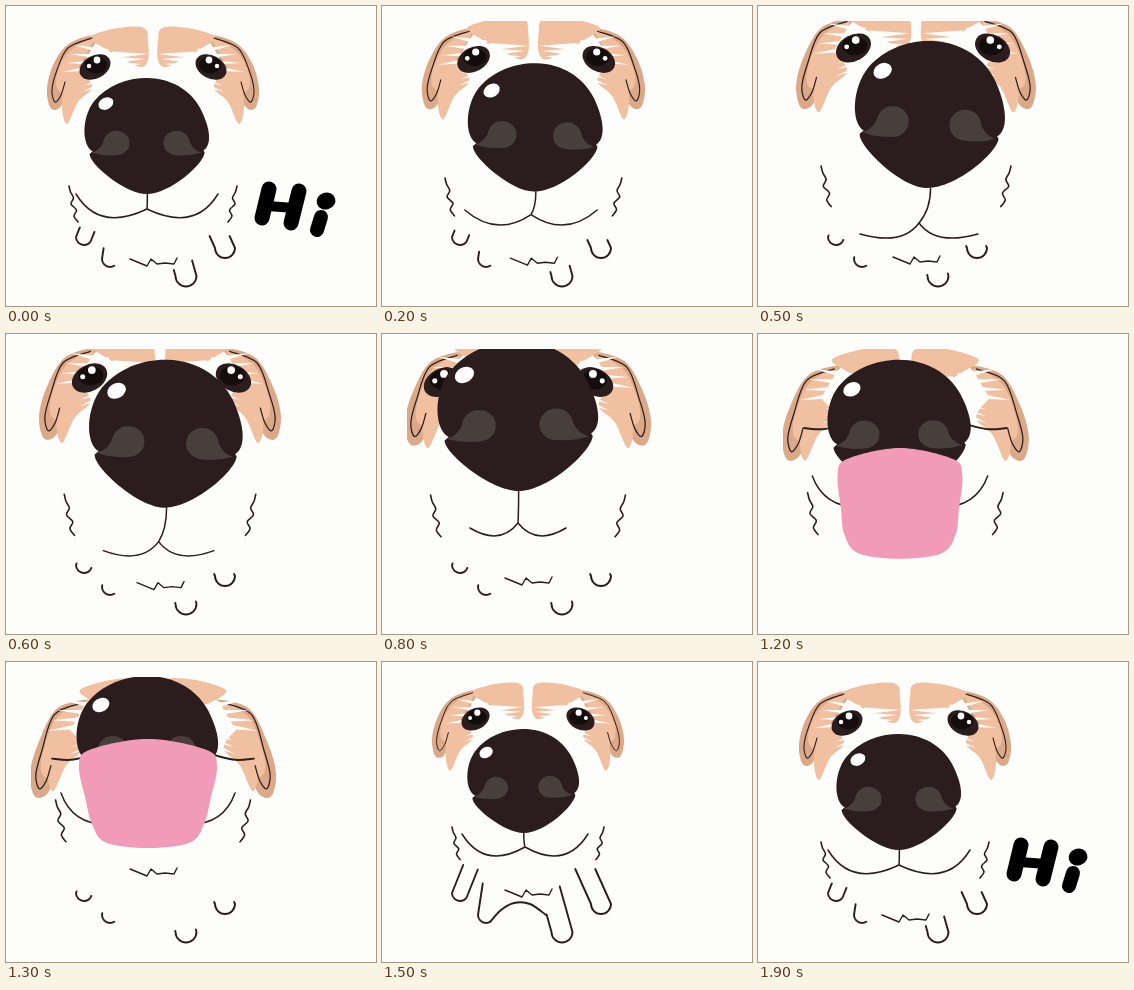
Write an HTML page with a canvas that moves like this. It is 370x300 px and loops after 2000 ms.

```html
<!DOCTYPE html>
<html lang="en">
<head>
<meta charset="utf-8">
<title>Puppy says Hi</title>
<style>
html, body { margin: 0; width: 100%; height: 100%; overflow: hidden; background: #fdfefc; }
canvas { display: block; }
</style>
</head>
<body>
<canvas id="stage" width="370" height="300" role="img" aria-label="Hi"></canvas>
<script>
const ctx = document.getElementById('stage').getContext('2d');
const LOOP = 2000, STEP = 100;
const PAPER = '#fdfefc', INK = '#2b1d1d', PEACH = '#f0c0a1', EAR = '#dba988', PINK = '#f19bb9';

// nose: left, top, width, height, tilt in degrees
// head: x, y, scale, ear drop; eyes: left and right shift
// mouth: joint x, joint y, half width, lift of the corners
// body: cheek fur y, chest fur y, leg length
// tongue: top, bottom, half width above, half width below
const rest = { nose: [78, 72, 125, 116, 0], head: [147, 61, 1, 0], eyes: [0, 0], mouth: [141, 203, 71, 15], body: [180, 253, 12] };
const lean = { nose: [96, 35, 151, 147, 3], head: [158, 42, 1.13, 11], eyes: [3, 11], mouth: [161, 217, 59, -11], body: [160, 251, 2] };
const near = { nose: [55, 7, 161, 150, -1], head: [146, 48, 1.16, 12], eyes: [-19, 0], mouth: [136, 189, 48, -5], body: [161, 244, 2] };
const pant = { nose: [67, 49, 147, 136, -1], head: [148, 55, 1.17, 3], eyes: [0, 0], mouth: [142, 187, 89, 23], body: [200, 230, 2], tongue: [188, 302, 49, 55] };
const lick = { nose: [70, 14, 142, 132, 0], head: [147, 63, 1.16, 20], eyes: [0, 0], mouth: [142, 155, 87, 24], body: [138, 207, 2], tongue: [77, 186, 69, 56] };
const stand = { nose: [85, 67, 112, 104, -1], head: [146, 57, 0.905, 0], eyes: [0, 0], mouth: [143, 185, 63, 13], body: [165, 228, 35] };
const keys = [[0, rest], [500, lean], [800, near], [1000, pant], [1300, lick], [1500, stand], [1900, rest], [2000, rest]];

for (const [, pose] of keys) pose.tongue ??= [pose.mouth[1], pose.mouth[1], 0, 0];

function poseAt(t) {
  const i = keys.findIndex(k => k[0] > t);
  const [t0, a] = keys[i - 1], [t1, b] = keys[i];
  const u = (t - t0) / (t1 - t0), pose = {};
  for (const part in a) pose[part] = a[part].map((v, n) => v + (b[part][n] - v) * u);
  return pose;
}

// Smooth curve through a flat list of points
function curve(p, closed) {
  const n = p.length / 2;
  const at = i => {
    const k = closed ? (i + n) % n : Math.max(0, Math.min(n - 1, i));
    return [p[2 * k], p[2 * k + 1]];
  };
  ctx.beginPath();
  ctx.moveTo(p[0], p[1]);
  for (let i = 0; i < (closed ? n : n - 1); i++) {
    const [a, b, c, d] = [at(i - 1), at(i), at(i + 1), at(i + 2)];
    ctx.bezierCurveTo(b[0] + (c[0] - a[0]) / 6, b[1] + (c[1] - a[1]) / 6,
      c[0] - (d[0] - b[0]) / 6, c[1] - (d[1] - b[1]) / 6, c[0], c[1]);
  }
}

function blob(color, p) {
  curve(p, true);
  ctx.fillStyle = color;
  ctx.fill();
}

function ink(width = 1.5, color = INK) {
  ctx.lineWidth = width;
  ctx.strokeStyle = color;
  ctx.stroke();
}

function line(p, width, color) {
  curve(p);
  ink(width, color);
}

function oval(color, x, y, rx, ry = rx, turn = 0) {
  ctx.beginPath();
  ctx.ellipse(x, y, rx, ry, turn, 0, 7);
  ctx.fillStyle = color;
  ctx.fill();
}

// Tapered white strand of fur
function tuft(x0, y0, x1, y1, w) {
  const dx = x1 - x0, dy = y1 - y0, k = w / Math.hypot(dx, dy);
  ctx.beginPath();
  ctx.moveTo(x0 - dy * k, y0 + dx * k);
  ctx.lineTo(x1, y1);
  ctx.lineTo(x0 + dy * k, y0 - dx * k);
  ctx.fillStyle = PAPER;
  ctx.fill();
}

function drawEye(x) {
  oval(INK, x, 61, 16.5, 11.5, -0.5);
  oval('#140d0d', x + 1, 59, 11, 8.5);
  oval('#fff', x + 2, 54, 3.4);
  oval('#fff', x - 6, 60, 2.2);
}

// Left half of the face, centre line at x = 0
function drawHalf(drop, shift, asleep) {
  ctx.save();
  ctx.translate(-147, -61);
  const d = drop, top = drop / 2;
  blob(EAR, [92, 29 + top, 64, 37 + top, 48, 57 + d, 41, 82 + d, 44, 101 + d, 52, 103 + d, 60, 92 + d, 70, 72, 84, 46]);
  blob(PEACH, [88, 32 + top, 64, 45 + top, 52, 65 + d, 51, 82 + d, 60, 84 + d, 72, 62 + top]);
  blob(PEACH, [62, 58, 78, 68, 86, 82, 72, 96, 61, 118, 56, 98]);
  blob(PEACH, [84, 31, 112, 22, 138, 22, 142, 36, 142, 54, 134, 61, 112, 50, 98, 42]);
  line([86, 32 + top, 62, 42 + top, 51, 64 + d, 46, 84 + d, 49, 96 + d, 55, 89 + d, 59, 76 + d], 1.1);
  for (let i = 0; i < 4; i++) {
    tuft(102 - 3 * i, 46 + 5 * i, 68 - 4 * i, 39 + 9 * i, 3);
    tuft(106, 49 + 5 * i, 142 - 3 * i, 48 + 5 * i, 3.5);
    tuft(106, 66 + 4 * i, 78 - i, 74 + 6 * i, 3);
  }
  if (asleep) line([60, 90, 76, 91, 94, 87], 1.7);
  else drawEye(89 + shift);
  ctx.restore();
}

function drawHead([x, y, s, drop], [left, right], asleep) {
  for (const side of [1, -1]) {
    ctx.save();
    ctx.translate(x, y);
    ctx.scale(s * side, s);
    drawHalf(drop, (side > 0 ? left : -right) / s, asleep);
    ctx.restore();
  }
}

function drawNose([x, y, w, h, tilt]) {
  ctx.save();
  ctx.translate(x + w / 2, y + h / 2);
  ctx.rotate(tilt * Math.PI / 180);
  ctx.scale(w, h);
  ctx.translate(-0.5, -0.5);
  ctx.fillStyle = INK;
  ctx.fill(new Path2D('M.07 .632C-.02 .58-.02 .34 .08 .2C.19 .06 .35 0 .5 0C.69 0 .85 .1 .93 .26C1.02 .45 1.02 .58 .955 .625L.965 .64C.96 .74 .69 1 .5 1C.33 1 .04 .74 .045 .655Z'));
  for (const side of [1, -1]) {
    ctx.save();
    ctx.translate(0.5, 0);
    ctx.scale(side, 1);
    oval('#483e3c', -0.24, 0.56, 0.105, 0.105);
    ctx.fill(new Path2D('M-.44 .643Q-.36 .62-.335 .52L-.24 .665Q-.35 .675-.44 .643Z'));
    ctx.restore();
  }
  oval('#fff', 0.175, 0.22, 0.064, 0.05, -0.6);
  ctx.restore();
}

function drawMouth([x, y, w, lift], [nx, ny, nw, nh]) {
  const stem = nx + nw * 0.507, low = ny + nh;
  ctx.beginPath();
  ctx.moveTo(stem, low);
  ctx.quadraticCurveTo(stem, (low + y) / 2 + 4, x, y);
  for (const side of [-1, 1]) {
    ctx.moveTo(x, y);
    ctx.quadraticCurveTo(x + side * w * (0.45 + lift * 0.015), y + 23, x + side * w, y - lift);
  }
  ink();
}

function drawCheekFur([x, , s], y) {
  for (const side of [-1, 1]) {
    const p = [];
    for (let i = 0; i <= 6; i++) {
      const kink = i > 1 && i < 6 ? (i % 2 ? 2.5 : -1.5) : 0;
      p.push(x + side * s * (84 - i * 1.5 + kink), y + i * 6 * s);
    }
    line(p, 1.6);
  }
}

function drawChest(x, y) {
  ctx.beginPath();
  for (const [dx, dy] of [[-23, 0], [-6, 7], [-2, 0], [4, 5], [12, 4], [21, 5], [24, -1]]) ctx.lineTo(x + dx, y + dy);
  ink(1.4);
}

// Paw: an arc with two legs that lean as they grow
function paw(x, y, r, end, lean, left, right) {
  const ex = x + r * Math.cos(end), ey = y + r * Math.sin(end);
  ctx.beginPath();
  ctx.moveTo(x - r + lean * left, y - left);
  ctx.arc(x, y, r, Math.PI, end, true);
  ctx.lineTo(ex + lean * right, ey - right);
  ink(1.9);
}

function drawPaws(leg) {
  paw(78, 231, 8, 0.6, 0.4, leg * 0.8, leg * 0.8);
  paw(104, 253, 8, 1, 0.15, leg * 0.9, 0);
  paw(180, 270, 10.5, 0, -0.28, leg * 0.5, leg * 1.3);
  paw(219, 242, 10, 0, -0.45, leg, leg);
  if (leg > 30) line([108, 260, 119, 248, 132, 241, 148, 242, 164, 253], 1.9);
}

function drawTongue(x, [top, bottom, a, b], panting) {
  const h = bottom - top;
  const side = [[a * 0.85, 0.1], [a, 0.25], [(a + b) / 2, 0.55], [b, 0.78], [b * 0.75, 0.95]];
  const at = ([dx, v], k) => [x + k * dx, top + v * h];
  blob(PINK, [x, top, ...side.flatMap(p => at(p, 1)), x, bottom, ...side.reverse().flatMap(p => at(p, -1))]);
  if (!panting) return;
  ctx.beginPath();
  ctx.roundRect(x - 38, top + 39, 77, 49, 24);
  ctx.fillStyle = '#e38fae';
  ctx.fill();
}

function drawHi() {
  const bars = [[263, 183, 256, 212, 15], [293, 185, 285, 217, 15], [262, 200, 288, 202, 10], [315, 211, 311, 224, 14]];
  for (const [x0, y0, x1, y1, w] of bars) line([x0, y0, x1, y1], w, '#000');
  oval('#000', 320, 195, 9.5, 8.5, -0.3);
}

function draw(t) {
  const { nose, head, eyes, mouth, body, tongue } = poseAt(t);
  const [cheekY, chestY, leg] = body;
  ctx.fillStyle = PAPER;
  ctx.fillRect(0, 0, 370, 300);
  ctx.save();
  ctx.beginPath();
  ctx.rect(25, 15, 310, 270);
  ctx.clip();
  ctx.lineCap = ctx.lineJoin = 'round';
  drawHead(head, eyes, t >= 1200 && t < 1400);
  drawCheekFur(head, cheekY);
  if (t < 900 || t > 1200) {
    drawChest(head[0], chestY);
    drawPaws(leg);
  }
  drawNose(nose);
  drawMouth(mouth, nose);
  if (tongue[2] > 0) drawTongue(mouth[0], tongue, t === 1000);
  if (t < 200 || t >= 1700) drawHi();
  ctx.restore();
}

const start = performance.now();
function tick() {
  const t = (performance.now() - start) % LOOP;
  draw(Math.floor(t / STEP) * STEP);
  requestAnimationFrame(tick);
}
tick();
</script>
</body>
</html>
```
